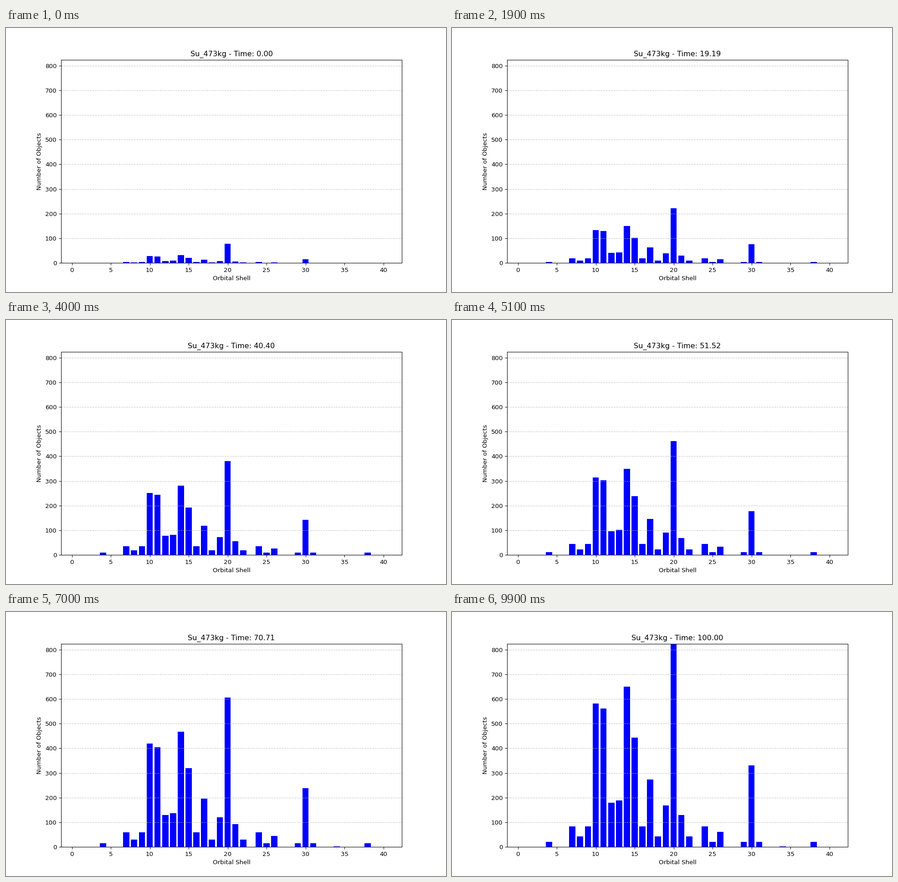
These frames come from a looping animation (966x580 px, 10000 ms). A matplotlib script:

```python
import matplotlib.pyplot as plt
import numpy as np
from matplotlib.animation import FuncAnimation

FRAMES = 100
SHELLS = np.arange(1, 41)
Y_MAX = 824
PEAK = 20

# Final object count -> shells that reach it
FINAL = {
    2: [34], 21: [4, 25, 29, 31, 38], 42: [8, 18, 22], 62: [26],
    83: [7, 9, 16, 24], 129: [21], 168: [19], 180: [12], 189: [13],
    273: [17], 330: [30], 443: [15], 562: [11], 582: [10], 649: [14],
    Y_MAX: [PEAK],
}

final = np.zeros(len(SHELLS))
for count, shells in FINAL.items():
    final[np.array(shells) - 1] = count

# Each shell grows steadily from one batch to 21; the peak starts with two
batches = np.where(SHELLS == PEAK, 2, 1)
first = final * batches / 21


def counts(i):
    return first + (final - first) * i / (FRAMES - 1)


fig, ax = plt.subplots(figsize=(10, 6.0042), dpi=96.6)  # 966 x 580 px
bars = ax.bar(SHELLS, counts(0), color="blue")
ax.set_ylim(0, Y_MAX)
ax.set_xlabel("Orbital Shell")
ax.set_ylabel("Number of Objects")
ax.grid(axis="y", linestyle="--", alpha=0.7)
title = ax.set_title("")


def update(i):
    for bar, height in zip(bars, counts(i)):
        bar.set_height(height)
    title.set_text(f"Su_473kg - Time: {100 * i / (FRAMES - 1):.2f}")
    return [*bars, title]


anim = FuncAnimation(fig, update, frames=FRAMES, interval=100,
                     repeat=True, repeat_delay=0, blit=False)
plt.show()
```
